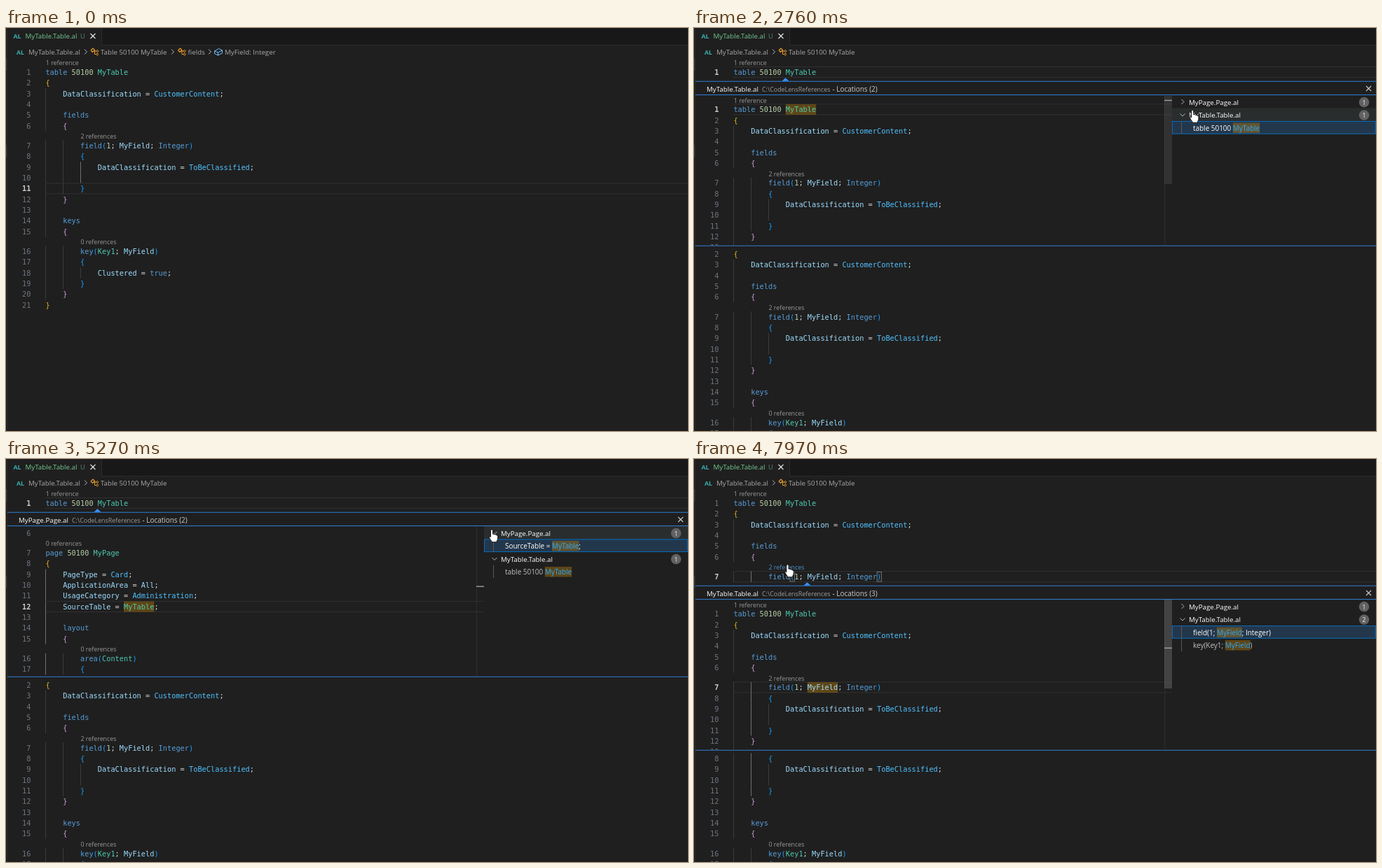
An HTML page with a canvas that plays this animation: 973x576 px, repeating every 8000 ms.

```html
<!DOCTYPE html>
<html lang="en">
<head>
<meta charset="utf-8">
<title>Code lens references</title>
<style>
html, body { margin: 0; width: 100%; height: 100%; overflow: hidden; background: #1f1f1f; }
canvas { display: block; }
</style>
</head>
<body>
<canvas id="stage" width="973" height="576"></canvas>
<script>
const ctx = document.getElementById('stage').getContext('2d');
const W = 973, H = 576, LOOP = 8000;
// The editor is shown at about 81 %, so hairlines are thinner than a pixel.
const HAIR = .81;
const CHAR = 6.2, LINE = 15.34, LENS = 13, LEFT = 56.4, ROW = 18.5;
const MONO = '10.3px "DejaVu Sans Mono", monospace';
const ui = size => `${size}px "Open Sans", "Noto Sans", sans-serif`;
const UI = ui(9.75), RESULT = ui(9.95), PATH = ui(8.87), SMALL = ui(8.9);
const BG = '#1f1f1f', EDGE = '#2b2b2b', BLUE = '#3794ff', MATCH = 'rgba(187,128,9,.4)';
const BRACKETS = ['#e5b11c', '#cc9fd6', '#179fff'];
const PLAIN = '#9cdcfe';

const WORDS = {};
const paint = (color, names) => names.split(' ').forEach(n => WORDS[n] = color);
paint('#569cd6', 'table fields field keys key page layout area true Integer');
paint('#4ec9b0', 'MyTable MyPage Key1 Content');
paint('#4fc1ff', 'CustomerContent ToBeClassified Card Administration');

const TABLE = layout(1, 63.2, { 1: '1 reference', 7: '2 references', 16: '0 references' }, [
  'table 50100 MyTable', '{', '    DataClassification = CustomerContent;', '    ',
  '    fields', '    {', '        field(1; MyField; Integer)', '        {',
  '            DataClassification = ToBeClassified;', '            ', '        }', '    }', '    ',
  '    keys', '    {', '        key(Key1; MyField)', '        {',
  '            Clustered = true;', '        }', '    }', '}']);

const PAGE = layout(6, 106, { 7: '0 references', 16: '0 references' }, [
  '', 'page 50100 MyPage', '{', '    PageType = Card;', '    ApplicationArea = All;',
  '    UsageCategory = Administration;', '    SourceTable = MyTable;', '    ',
  '    layout', '    {', '        area(Content)', '        {']);

function layout(first, top, lenses, lines) {
  let y = top;
  return lines.map((text, i) => {
    const n = first + i, lens = lenses[n];
    if (i) y += LINE + (lens ? LENS : 0);
    return { n, text, y, lens, indent: text.match(/^ */)[0].length };
  });
}

function rect(x, y, w, h, color) {
  ctx.fillStyle = color;
  ctx.fillRect(x, y, w, h);
}

// Outline that lies inside the given box.
function frame(x, y, w, h, color) {
  ctx.strokeStyle = color;
  ctx.lineWidth = HAIR;
  ctx.strokeRect(x + HAIR / 2, y + HAIR / 2, w - HAIR, h - HAIR);
}

function path(points, color, width = 1) {
  ctx.beginPath();
  points.forEach(([x, y], i) => i ? ctx.lineTo(x, y) : ctx.moveTo(x, y));
  ctx.strokeStyle = color;
  ctx.lineWidth = width;
  ctx.stroke();
}

// y is the vertical middle of the capitals; returns the right end.
function label(text, x, y, color, font = UI, align = 'left') {
  ctx.font = font;
  ctx.textAlign = align;
  ctx.fillStyle = color;
  ctx.fillText(text, x, y + 3.5);
  return x + ctx.measureText(text).width;
}

function chevron(x, y, down) {
  path(down ? [[x - 3.5, y - 1.5], [x, y + 2], [x + 3.5, y - 1.5]]
            : [[x - 1.5, y - 3.5], [x + 2, y], [x - 1.5, y + 3.5]], '#b5b5b5');
}

function cross(x, y, r, color) {
  path([[x - r, y - r], [x + r, y + r]], color, 1.1);
  path([[x - r, y + r], [x + r, y - r]], color, 1.1);
}

function clipped(x, y, w, h, draw) {
  ctx.save();
  ctx.beginPath();
  ctx.rect(x, y, w, h);
  ctx.clip();
  draw();
  ctx.restore();
}

function mono(text, x, y) {
  ctx.font = MONO;
  ctx.textAlign = 'left';
  for (let i = 0; i < text.length; i++)
    if (text[i] !== ' ') ctx.fillText(text[i], x + i * CHAR, y + 3.7);
}

function codeRow(row, y, semantic) {
  for (const m of row.text.matchAll(/\w+|\S/g)) {
    const word = m[0];
    let color = PLAIN;
    if (/[{}()]/.test(word)) color = BRACKETS[row.indent / 4];
    else if (/^\d/.test(word)) color = '#b5cea8';
    else if (/\W/.test(word)) color = '#d4d4d4';
    else if (WORDS[word] && (semantic || WORDS[word] === '#569cd6')) color = WORDS[word];
    ctx.fillStyle = color;
    mono(word, LEFT + m.index * CHAR, y);
  }
}

function code(rows, o) {
  const { dy = 0, cur, right = W, guide, hover, mark, semantic = true } = o;
  for (const row of rows) {
    const y = row.y + dy;
    if (row.n === cur) {
      rect(56, y - 8.2, right - 56, 1, '#303030');
      rect(56, y + 6.9, right - 56, 1, '#303030');
    }
    for (let col = 0; col < row.indent; col += 4) {
      const lit = guide && guide.col === col && row.n >= guide.from && row.n <= guide.to;
      rect(Math.round(LEFT + col * CHAR), y - 7.7, 1, LINE, lit ? '#707070' : '#3b3b3b');
    }
    if (mark && row.n === cur) {
      const at = row.text.indexOf(mark);
      rect(LEFT + at * CHAR, y - 7.5, mark.length * CHAR, 15, MATCH);
    }
    if (row.lens)
      label(row.lens, LEFT + row.indent * CHAR + .4, y - 13.5, hover === row.n ? '#4e94ce' : '#999999', SMALL);
    label(row.n, 35.5, y + .2, row.n === cur ? '#cccccc' : '#6e7681',
      (row.n === cur ? 'bold ' : '') + MONO, 'right');
    codeRow(row, y, semantic);
  }
}

function classIcon(x, y) {
  const c = '#ee9d28';
  path([[x, y - 2], [x + 3, y - 5], [x + 5.5, y - 2.5], [x + 2.5, y + .5], [x, y - 2]], c, 1.2);
  path([[x + 4, y - 1], [x + 8, y - 1]], c);
  path([[x + 5.5, y - 1], [x + 5.5, y + 3.5], [x + 8, y + 3.5]], c);
  for (const d of [-1, 3.5])
    path([[x + 7.5, y + d], [x + 9.2, y + d - 1.7], [x + 11, y + d], [x + 9.2, y + d + 1.7], [x + 7.5, y + d]], c);
}

function cubeIcon(x, y) {
  const c = '#75beff';
  path([[x, y - 1], [x + 6, y - 4.5], [x + 11, y - 2], [x + 11, y + 2], [x + 5, y + 5], [x, y + 2.5], [x, y - 1],
    [x + 5, y + 1], [x + 11, y - 2]], c);
  path([[x + 5, y + 1], [x + 5, y + 5]], c);
}

function chrome(deep) {
  rect(0, 0, W, H, BG);
  rect(0, 0, W, 24, '#181818');
  rect(0, 0, 1, H, '#181818');
  rect(2, 0, 134, 25, BG);
  rect(136, 24, W - 136, 1, EDGE);
  rect(136, 0, 1, 24, EDGE);
  rect(1, 0, 1, H, EDGE);
  rect(0, 43, 1, 18, '#37373d');
  rect(0, 167, 1, 18, '#37373d');
  const teal = '#3aaeb0', grey = '#a9a9a9', icon = 'bold ' + ui(8.8);
  label('AL', 10.5, 11.8, teal, icon);
  label('MyTable.Table.al', 27.5, 11.8, '#73c991');
  label('U', 106, 11.8, '#54906a', ui(9.2));
  cross(124, 11.5, 3.5, '#e8e8e8');
  label('AL', 15, 34, teal, icon);
  label('MyTable.Table.al', 32, 34, grey);
  chevron(113.5, 34);
  classIcon(121, 34);
  label('Table 50100 MyTable', 135, 34, grey);
  if (!deep) return;
  chevron(237.5, 34);
  classIcon(245.5, 34);
  label('fields', 259.5, 34, grey);
  chevron(290.5, 34);
  cubeIcon(297.5, 34);
  label('MyField: Integer', 312, 34, grey);
}

function treeRow(item, y, mouseRow, guides) {
  const mid = y + ROW / 2 + .6;
  if (item.selected) rect(682, y, 291, ROW, '#23374c');
  else if (mouseRow) rect(682, y, 291, ROW, '#2a2d2e');
  if (item.focus) frame(682, y, 290.6, ROW, '#0078d4');
  if (item.file) {
    chevron(697, mid - .4, item.open);
    label(item.file, 706, mid + .2, '#ffffff');
    ctx.beginPath();
    ctx.arc(956, mid + .2, 7.3, 0, Math.PI * 2);
    ctx.fillStyle = '#616161';
    ctx.fill();
    label(item.count, 956, mid + .2, '#f8f8f8', ui(8.5), 'center');
    return;
  }
  if (guides) rect(695, y, 1, ROW, '#585858');
  const [before, match, after] = item.parts, color = item.selected ? '#ffffff' : '#c0c0c0';
  const x = label(before, 712, mid + .2, color, RESULT);
  rect(x, mid - 7.4, ctx.measureText(match).width, 14.5, MATCH);
  label(after, label(match, x, mid + .2, '#2aaaff', RESULT), mid + .2, color, RESULT);
}

function peek(o) {
  const { top, arrow, page, count, items, mouse, slider, ruler, guides } = o;
  const body = top + 25 * HAIR, bottom = top + 235;
  rect(2, top, W - 2, bottom - top, BG);
  ctx.beginPath();
  ctx.moveTo(arrow - 5, top);
  ctx.lineTo(arrow, top - 4.5);
  ctx.lineTo(arrow + 5, top);
  ctx.fillStyle = BLUE;
  ctx.fill();
  const shift = page ? -3 : 0;
  label(page ? 'MyPage.Page.al' : 'MyTable.Table.al', 18, top + 11.2, '#ffffff');
  label('C:\\CodeLensReferences', 97 + shift, top + 11.2, '#9d9d9d', PATH);
  label(`- Locations (${count})`, 197.5 + shift, top + 11.2, '#cccccc', RESULT);
  cross(962.5, top + 10.7, 3.5, '#cccccc');
  clipped(2, body, 680, bottom - body, () => {
    rect(671, body, 1, bottom - body, '#2d2d2d');
    code(page ? PAGE : TABLE, o.editor);
    if (slider) rect(671, slider.y, 11, slider.h, `rgba(121,121,121,${.4 * slider.alpha})`);
    if (ruler) rect(671, ruler, 11, 1.4, '#a0a0a0');
  });
  items.forEach((item, i) => {
    const y = body + i * ROW;
    treeRow(item, y, mouse.x > 682 && mouse.y >= y && mouse.y < y + ROW, guides);
  });
  for (const y of [top, body - HAIR, bottom]) rect(2, y, W - 2, HAIR, BLUE);
}

const TRACK = [[190, 686, 513], [330, 356, 297], [455, 356, 297], [660, 179, 183], [800, 179, 183],
  [1420, 89, 51], [2090, 89, 51], [2690, 711, 117], [2960, 712, 119], [3020, 712, 119],
  [3300, 709, 102], [3420, 709, 102], [3640, 710, 122], [4815, 710, 122], [5200, 693, 101],
  [5535, 693, 101], [6400, 89, 51], [7045, 89, 51], [7680, 133.5, 151]];

function mouseAt(time) {
  // The pointer is sampled fifteen times a second.
  const t = Math.floor((time + 10) / 66.66) * 66.66 - 10;
  const i = TRACK.findIndex(k => k[0] > t + 1);
  if (i === 0) return { x: -99, y: -99 };
  if (i < 0) return { x: 133.5, y: 151 };
  const [t0, x0, y0] = TRACK[i - 1], [t1, x1, y1] = TRACK[i];
  const k = Math.max(0, (t - t0) / (t1 - t0)), e = k * (2 - k);
  return { x: x0 + (x1 - x0) * e, y: y0 + (y1 - y0) * e };
}

const HAND = new Path2D('M-1.6 1.5Q-1.4-.2 0-.2Q1.5-.2 1.5 1.5V6.3Q3.4 5.6 4.2 7Q5.8 6.4 6.5 7.7Q8.6 7.4 8.7 9.3V12.7' +
  'Q8.4 14.7 7.4 15.9V17.8H-.2V16.5Q-2.4 14.3-3.6 11.1Q-4 9.4-2.7 9.4L-1.6 10.7Z');

function pointer({ x, y }, hand) {
  if (!hand) {
    for (const d of [-6, 6]) path([[x - 2.5, y + d], [x + 2.5, y + d]], '#dddddd');
    path([[x, y - 6], [x, y + 6]], '#dddddd');
    return;
  }
  ctx.save();
  ctx.translate(x, y);
  ctx.fillStyle = '#ffffff';
  ctx.strokeStyle = '#111111';
  ctx.lineWidth = 1;
  ctx.fill(HAND);
  ctx.stroke(HAND);
  ctx.restore();
}

const fade = (t, from, to) => Math.max(0, Math.min(1, (to - t) / (to - from)));

function firstPeek(t, mouse) {
  const page = t >= 3940, open = t >= 3400;
  const source = { parts: ['SourceTable = ', 'MyTable', ';'], selected: page, focus: page };
  const items = [
    { file: 'MyPage.Page.al', count: 1, open, focus: open && !page },
    ...(open ? [source] : []),
    { file: 'MyTable.Table.al', count: 1, open: true },
    { parts: ['table 50100 ', 'MyTable', ''], selected: !page, focus: !open }];
  let slider = null;
  if (page) {
    const crossing = t > 5650 && mouse.y > 96 && mouse.x < 682;
    slider = { y: 135, h: 98, alpha: crossing ? 1 : fade(t, 4880, 5080) };
  } else if (t >= 2350) {
    slider = { y: 97, h: 126, alpha: fade(t, 2600, 2960) };
  }
  peek({
    top: 75.8, arrow: 130.5, page, count: 2, items, mouse, slider, ruler: page ? 181.5 : 102.8,
    guides: mouse.x > 682,
    editor: page
      ? { cur: 12, right: 681, mark: 'MyTable', guide: { col: 0, from: 8, to: 17 }, semantic: t >= 4420 }
      : { dy: 53.3, cur: 1, right: 681, mark: 'MyTable' }
  });
}

function secondPeek(t, mouse) {
  const late = t >= 7970;
  peek({
    top: 180.8, arrow: 161.5, count: 3, mouse, ruler: 269.5, guides: late,
    slider: late && { y: 201, h: 127, alpha: 1 },
    items: [
      { file: 'MyPage.Page.al', count: 1 },
      { file: 'MyTable.Table.al', count: 2, open: true },
      { parts: ['field(1; ', 'MyField', '; Integer)'], selected: true, focus: true },
      { parts: ['key(Key1; ', 'MyField', ')'] }],
    editor: { dy: 158.3, cur: 7, right: 681, mark: 'MyField', guide: { col: 4, from: 7, to: 11 } }
  });
}

function draw(t) {
  const mouse = mouseAt(t);
  const first = t >= 1750 && t < 6520, second = t >= 7770, opened = first || second;
  const cur = t < 1750 ? 11 : second ? 7 : 1;
  const inside = (x0, y0, x1, y1) => mouse.x >= x0 && mouse.x <= x1 && mouse.y >= y0 && mouse.y <= y1;
  const hover = inside(57, 44, 105, 57) ? 1 : !first && inside(106, 148, 159, 161) ? 7 : 0;
  const guide = cur === 11 ? { col: 8, from: 9, to: 10 } : cur === 7 ? { col: 4, from: 7, to: 11 } : null;

  chrome(t < 1890);
  if (opened) {
    code(TABLE.filter(r => r.n <= cur), { cur, hover, guide });
    code(TABLE.filter(r => r.n > cur), { dy: 244.6, guide });
  } else {
    code(TABLE, { cur, hover, guide });
    if (cur === 1) rect(130, 56, 1.4, 14.5, '#d0d0d0');
  }
  if (second)
    for (const col of [13, 33]) frame(LEFT + col * CHAR - .3, 161, 7, 14.5, '#888888');
  if (first) firstPeek(t, mouse);
  if (second) secondPeek(t, mouse);
  pointer(mouse, hover || (opened && mouse.x > 682));
}

function tick(now) {
  draw(now % LOOP);
  requestAnimationFrame(tick);
}
requestAnimationFrame(tick);
</script>
</body>
</html>
```
